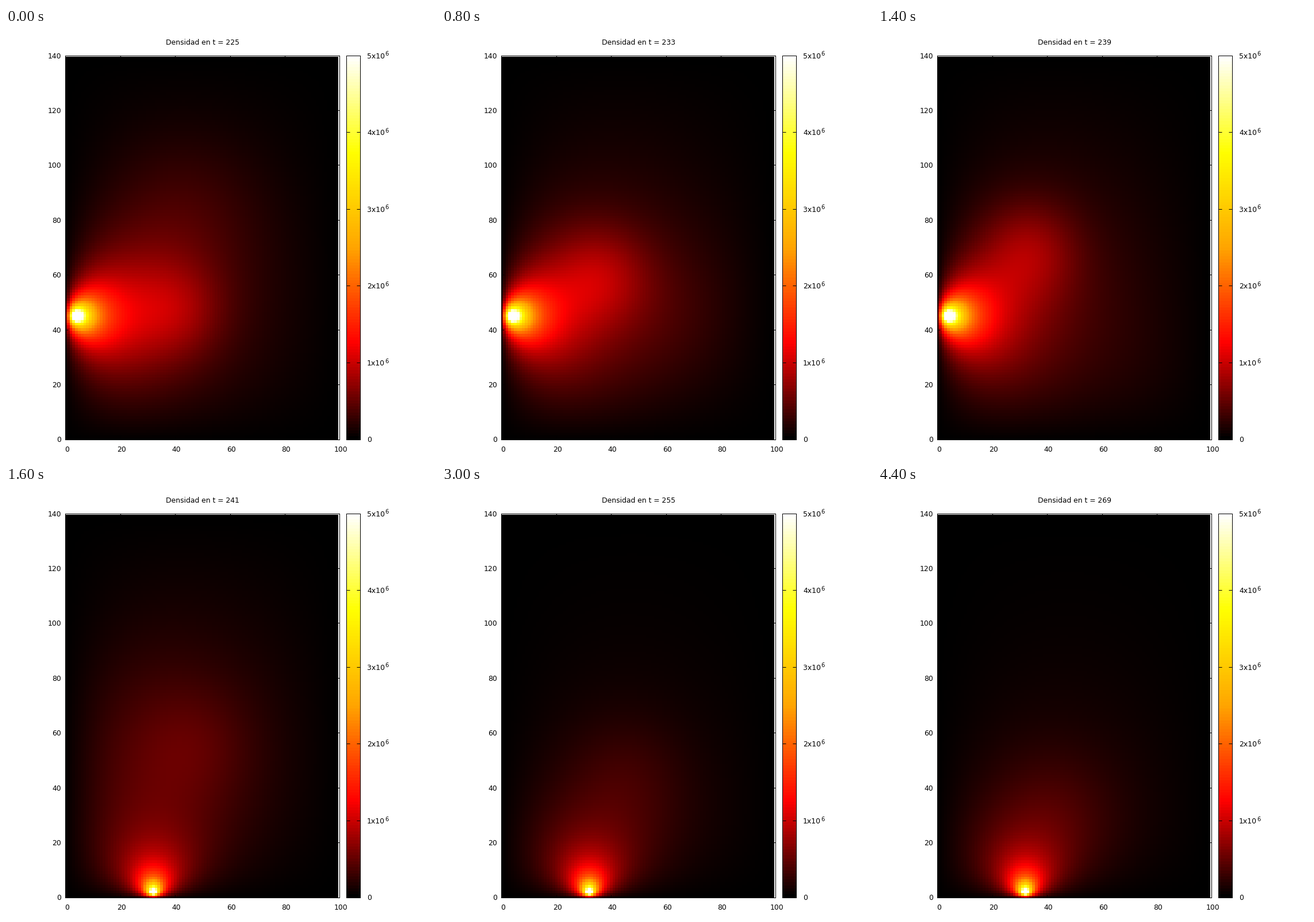
Animation, 748 px wide and 748 px high, one loop 4.5 s. Source, as a matplotlib script:

```python
import numpy as np
import matplotlib.pyplot as plt
from matplotlib.animation import FuncAnimation
from matplotlib.colors import LinearSegmentedColormap
from matplotlib.patches import Rectangle

SIZE, DPI = 748, 100
FRAMES, INTERVAL = 45, 100
T0, T_SWITCH, T_END = 225, 240, 269
NX, NY = 100, 140
DIFFUSION = 290
STRENGTH = 3.1e6 * 2 * np.pi
VMAX = 5e6
LEFT, RIGHT, TOP, BOTTOM = 103.5, 580.5, 47.5, 715.5
BAR_L, BAR_R = 592.5, 616.5
PX = 72 / DPI
FONT = 12.4

plt.rcParams["font.family"] = "DejaVu Sans"


# Diffusion between absorbing walls, solved in the sine basis.
def sine_basis(n):
    m = np.arange(1, n + 1)
    basis = np.sin(np.pi * np.outer(np.arange(n) + 0.5, m) / n)
    basis /= np.sqrt((basis ** 2).sum(axis=0))
    return basis, 2 - 2 * np.cos(np.pi * m / n)


BX, LX = sine_basis(NX)
BY, LY = sine_basis(NY)
RATE = LY[:, None] + LX[None, :]
GX, GY = np.meshgrid(np.arange(NX), np.arange(NY))
WALLS = np.sin(np.pi * (GX + 0.5) / NX) * np.sin(np.pi * (GY + 0.5) / NY)


def steady(x, y):
    src = np.zeros((NY, NX))
    src[y, x] = STRENGTH
    return BY.T @ src @ BX / RATE


SIDE = steady(4, 45)
FLOOR = steady(32, 2)


def puff(u, start, end, amp, width):
    """Soft cloud that drifts from start to end as u goes from 0 to 1."""
    x, y = (1 - u) * np.array(start) + u * np.array(end)
    r2 = (GX - x) ** 2 + (GY - y) ** 2
    return amp * WALLS * np.exp(-r2 / (2 * width ** 2))


def density(t):
    age = max(0, t - T_SWITCH)
    coef = FLOOR + (SIDE - FLOOR) * np.exp(-RATE * DIFFUSION * age)
    field = BY @ coef @ BX.T
    if t <= T_SWITCH:
        u = (t - T0) / 10
        field += puff(u, (38, 45), (33, 62), 5e5, 13)
        field += puff(u, (42, 85), (75, 30), 1.5e5, 22)
    else:
        u = age / (T_END - T_SWITCH)
        field += puff(u, (48, 55), (42, 28), 1.6e5, 16)
    return field


def palette(levels):
    colors = ["black", "red", "orange", "yellow", "white"]
    return LinearSegmentedColormap.from_list("heat", colors, N=levels)


fig = plt.figure(figsize=(SIZE / DPI, SIZE / DPI), dpi=DPI, facecolor="white")
ax = fig.add_axes([0, 0, 1, 1])
ax.set_xlim(0, SIZE)
ax.set_ylim(SIZE, 0)
ax.axis("off")


def px(x):
    return LEFT + x * (RIGHT - LEFT) / NX


def py(y):
    return BOTTOM - y * (BOTTOM - TOP) / NY


def edges(n):
    return np.clip(np.arange(n + 1) - 0.5, 0, None)


def line(x0, y0, x1, y1):
    ax.plot([x0, x1], [y0, y1], color="black", lw=PX, solid_capstyle="butt", zorder=3)


def frame(x0, x1):
    ax.add_patch(Rectangle((x0, TOP), x1 - x0, BOTTOM - TOP, fill=False,
                           ec="black", lw=PX, zorder=4))


def label(x, y, s, ha="center", size=FONT):
    return ax.text(x, y, s, ha=ha, va="baseline", fontsize=size * PX, color="black")


heat = ax.pcolormesh(px(edges(NX)), py(edges(NY)), density(T0),
                     cmap=palette(1024), vmin=0, vmax=VMAX)
ax.pcolormesh([BAR_L, BAR_R], np.linspace(BOTTOM, TOP, 129),
              np.linspace(0, 1, 128)[:, None], cmap=palette(128))
ax.set_xlim(0, SIZE)
ax.set_ylim(SIZE, 0)

frame(LEFT, RIGHT)
frame(BAR_L, BAR_R)
for v in range(0, NX + 1, 20):
    line(px(v), TOP, px(v), TOP + 5)
    line(px(v), BOTTOM, px(v), BOTTOM - 5)
    label(px(v) + 2.3, 736.7, str(v))
for v in range(0, NY + 1, 20):
    line(LEFT, py(v), LEFT + 5, py(v))
    line(RIGHT, py(v), RIGHT - 5, py(v))
    label(96.3, py(v) + 5, str(v), "right")
for k in range(6):
    y = BOTTOM + (TOP - BOTTOM) * k / 5
    line(BAR_L, y, BAR_L + 6, y)
    line(BAR_R, y, BAR_R - 6, y)
    label(628, y + 5, f"{k}x10" if k else "0", "left")
    if k:
        label(659, y + 0.7, "6", "left", FONT * 0.8)

title = label(342, 29, "")


def update(i):
    t = T0 + i
    heat.set_array(density(t))
    title.set_text(f"Densidad en t = {t}")
    return heat, title


anim = FuncAnimation(fig, update, frames=FRAMES, interval=INTERVAL,
                     repeat=True, repeat_delay=0)
plt.show()
```
